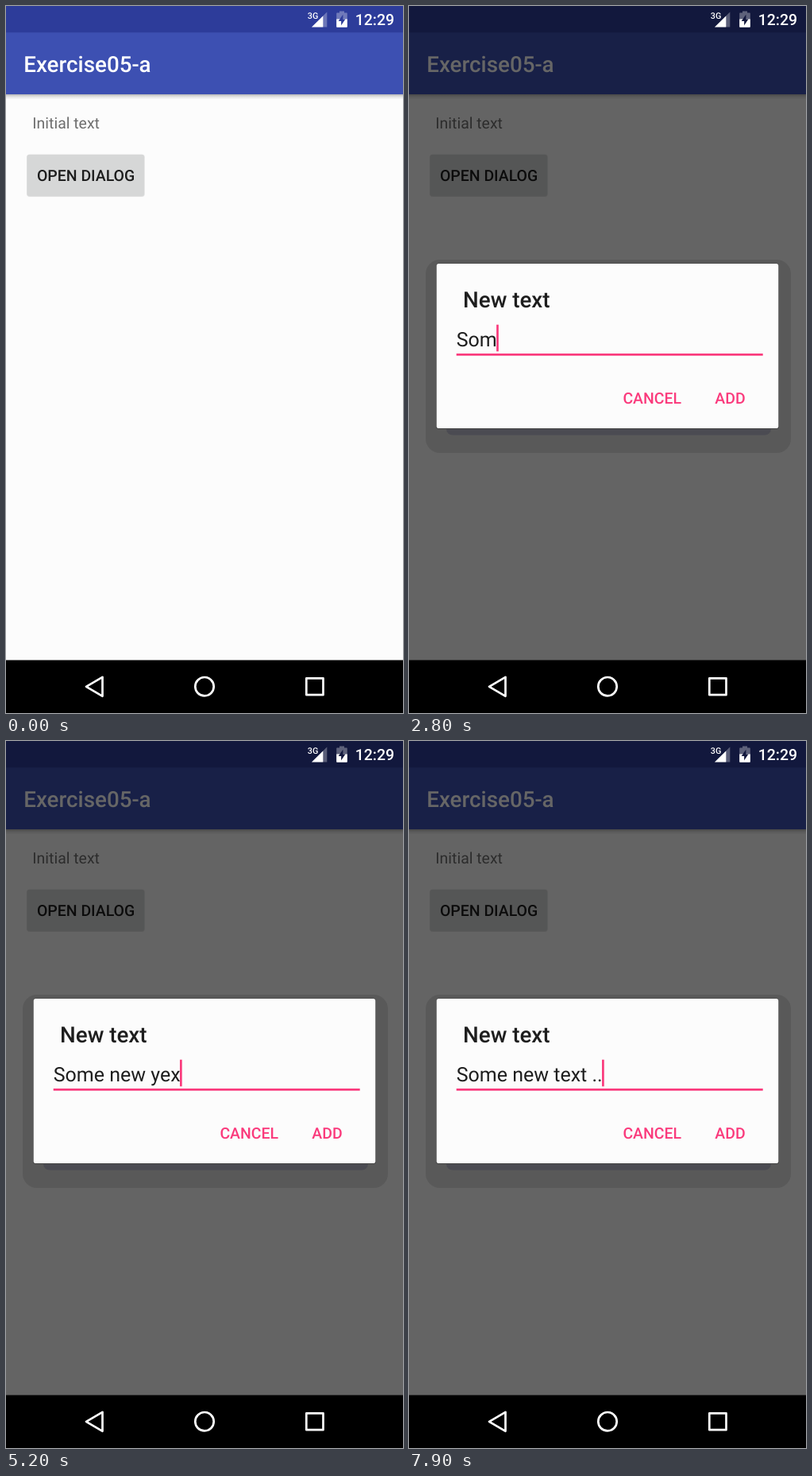
Recreate the animation shown at these times as an HTML page. Size 500 px wide and 889 px high, loop 8000 ms.

```html
<!DOCTYPE html>
<html lang="en">
<head>
<meta charset="utf-8">
<title>Open dialog</title>
<style>
  html, body { margin: 0; width: 100%; height: 100%; overflow: hidden; background: #fcfcfc; }
  svg { display: block; width: 100vw; height: 100vh; }
  text { font-family: Roboto, sans-serif; white-space: pre; text-rendering: geometricPrecision; }
  .medium { font-weight: 500; }
  .body { font-size: 19.44px; }
  .head { font-size: 27.78px; }
  .pink { fill: #fa3a7c; }
  .white { fill: #fff; }
  .nav { fill: none; stroke: #fff; stroke-width: 2.7; stroke-linejoin: round; }
</style>
</head>
<body>
<svg viewBox="0 0 500 889" preserveAspectRatio="none">
  <defs>
    <linearGradient id="drop" x1="0" y1="0" x2="0" y2="1">
      <stop offset="0" stop-opacity=".28"/>
      <stop offset=".5" stop-opacity=".1"/>
      <stop offset="1" stop-opacity=".02"/>
    </linearGradient>
    <clipPath id="charge"><rect x="410" y="16.4" width="30" height="12"/></clipPath>
    <path id="battery" fill-rule="evenodd"
      d="M417 8.6h3V6.6h6v2h3q.8 0 .8.8v16.6q0 .8-.8.8h-12q-.8 0-.8-.8V9.400q0-.8.8-.8z
         M424.400 10.800l-5.800 8.200h3.500v5.600l5.400-8.200h-3.100z"/>
  </defs>

  <!-- screen -->
  <rect width="500" height="889" fill="#fcfcfc"/>
  <rect y="111" width="500" height="6" fill="url(#drop)"/>
  <rect y="33" width="500" height="78" fill="#3d50b2"/>
  <rect width="500" height="33.300" fill="#2d3c9a"/>
  <text class="head medium white" x="22.200" y="82.600">Exercise05-a</text>
  <text class="body" x="33.300" y="154" fill="#6e6e6e">Initial text</text>

  <rect id="halo" x="23.500" y="183.500" width="152.500" height="61" rx="6" fill="#ebebeb"/>
  <rect x="26" y="186.400" width="148.800" height="53.600" rx="4" fill="#000" opacity=".1"/>
  <rect id="button" x="26.500" y="187" width="147.500" height="52" rx="3"/>
  <text class="body medium" x="38.900" y="220" fill="#1c1c1c">OPEN DIALOG</text>

  <!-- dialog -->
  <g id="dialog">
    <rect width="500" height="823" opacity=".6"/>
    <rect x="21" y="319" width="460" height="243" rx="18" fill="#595959"/>
    <rect x="47" y="520" width="409" height="19.500" rx="8" fill="#4b4b52"/>
    <rect x="34" y="323.500" width="432" height="208.500" rx="3.500" fill="#454545"/>
    <rect x="34.700" y="324" width="430.600" height="207" rx="2.800" fill="#fcfcfc"/>
    <text class="head medium" x="68" y="378.800" fill="#1e1e1e">New text</text>
    <text id="field" x="59.700" y="427.500" font-size="25" fill="#1e1e1e" xml:space="preserve"></text>
    <rect class="pink" x="59.700" y="437" width="386" height="2.700"/>
    <rect id="caret" class="pink" y="400.700" width="2.700" height="33.600"/>
    <text class="body medium pink" x="269.400" y="500">CANCEL</text>
    <text class="body medium pink" x="385.300" y="500">ADD</text>
  </g>

  <!-- status icons -->
  <text class="medium white" x="379.800" y="16" font-size="10.800" textLength="auto">3G</text>
  <path d="M385 26.500H404.300V7.500z" fill="#fff" opacity=".3"/>
  <path d="M385 26.500H399.300V12.400z" fill="#fff"/>
  <use href="#battery" fill="#fff" opacity=".32"/>
  <use href="#battery" fill="#fff" clip-path="url(#charge)"/>
  <text class="body medium white" x="489" y="24" text-anchor="end">12:29</text>

  <!-- navigation -->
  <rect y="822.500" width="500" height="66.500"/>
  <path class="nav" d="M101 855.800L121.500 843.800V867.800z"/>
  <circle class="nav" cx="250" cy="855.700" r="11.700"/>
  <rect class="nav" x="378.300" y="845.300" width="21.200" height="20.900"/>
</svg>

<script>
  const LOOP = 8000, OPEN = 1300, LEFT = 59.7;
  const [halo, button, dialog, field, caret] =
    ["halo", "button", "dialog", "field", "caret"].map(id => document.getElementById(id));

  // time, key ("<" deletes the last letter)
  const keys = [
    [2600, "S"], [2700, "o"], [2800, "m"], [3000, "e"], [3300, " "],
    [4000, "n"], [4100, "e"], [4200, "w"], [4400, " "],
    [4800, "y"], [5000, "e"], [5200, "x"], [5600, "<"], [5800, "<"], [5900, "<"],
    [6100, "t"], [6500, "e"], [6700, "x"], [7000, "t"], [7500, " "], [7800, "."], [7900, "."]
  ];
  const caretOff = [[1900, 2500], [3800, 4000]];

  const within = (t, [from, to]) => t >= from && t < to;
  const show = (node, on) => node.setAttribute("visibility", on ? "visible" : "hidden");

  function typed(t) {
    return keys.filter(([at]) => at <= t)
      .reduce((s, [, key]) => key === "<" ? s.slice(0, -1) : s + key, "");
  }

  function pressed(t) {
    if (t < 500 || t >= OPEN) return 0;
    return t < 600 ? 0.4 : t < 1000 ? 0.8 : 1;
  }

  function draw(t) {
    const press = pressed(t), open = t >= OPEN;
    halo.setAttribute("opacity", press);
    const tone = Math.round(214 - 11 * press);
    button.setAttribute("fill", `rgb(${tone},${tone + 1},${tone + 1})`);
    show(dialog, open);
    const text = typed(t);
    if (field.textContent !== text) field.textContent = text;
    const end = text ? field.getComputedTextLength() - 0.6 : 0;
    caret.setAttribute("x", LEFT + end);
    show(caret, open && !caretOff.some(span => within(t, span)));
  }

  const start = performance.now();
  function tick() {
    draw((performance.now() - start) % LOOP);
    requestAnimationFrame(tick);
  }
  tick();
</script>
</body>
</html>
```
